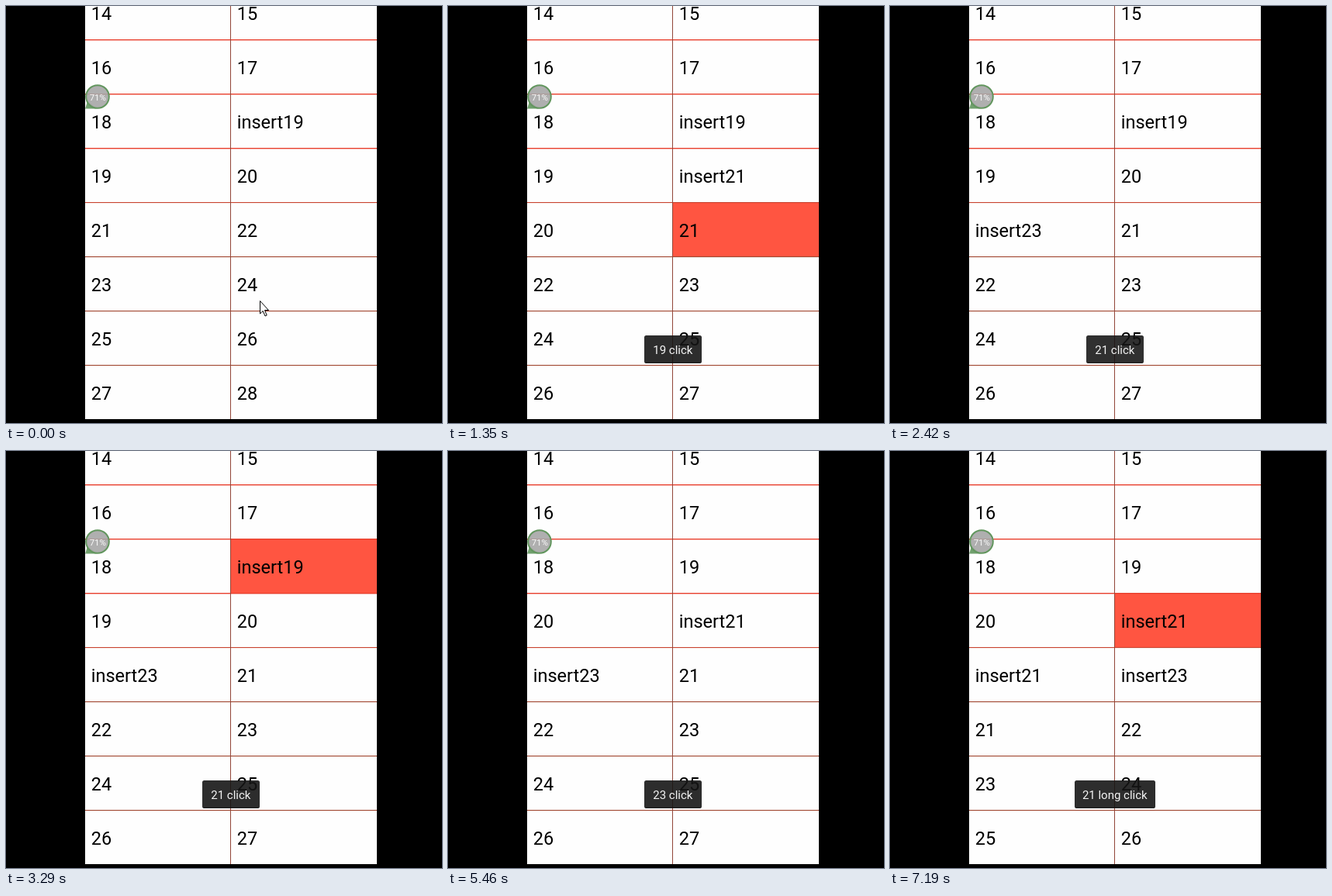
Recreate the animation shown at these times as an HTML page with a canvas. Size 562 px wide and 538 px high, loop 7.4 s.

```html
<!DOCTYPE html>
<html lang="en">
<head>
<meta charset="utf-8">
<title>Grid insert and remove</title>
<style>
html, body { margin: 0; width: 100%; height: 100%; overflow: hidden; background: #000; }
canvas { display: block; }
</style>
</head>
<body>
<canvas id="stage" width="562" height="538"></canvas>
<script>
const ctx = document.getElementById('stage').getContext('2d');
const LOOP = 7400;
const LEFT = 102, RIGHT = 478, MID = 289, BOTTOM = 533, ROW = 70;
const FIRST = 14; // index of the first visible cell

// Edits: time, index, insert or remove
const edits = [
  [880, 21, true], [1590, 23, true], [2420, 21, false],
  [3760, 19, false], [5460, 21, true], [6590, 21, true]
];

// Pressed cells: from, to, index
const presses = [
  [1350, 1590, 23], [2370, 2420, 21], [3290, 3760, 19],
  [6410, 6590, 21], [7190, LOOP, 21]
];

const toasts = [
  { at: 120, text: '19 click', width: 74 },
  { at: 1960, text: '21 click', width: 74 },
  { at: 3880, text: '23 click', width: 74 },
  { at: 5750, text: '21 long click', width: 104 }
];
const FADE_STEP = 58, FADE_STEPS = 9;

// Pointer: from, to, x, y
const pointers = [
  [0, 120, 327, 380], [6170, 6230, 509, 530],
  [6230, 6290, 485, 515], [6290, 6350, 497, 529]
];
const arrow = [[.5, .5], [.5, 17], [4.2, 13.5], [7, 20], [9.2, 19], [6.5, 12.5], [11.5, 12.5]];

const active = (t, [from, to]) => t >= from && t < to;

function toastFont() {
  ctx.font = 'condensed 16px Roboto, sans-serif';
  const narrow = ctx.measureText('21 long click').width < 85;
  return narrow ? ctx.font : '15px Roboto, sans-serif';
}
const TOAST_FONT = toastFont();

function itemsAt(t) {
  const items = Array.from({ length: 40 }, (_, i) => String(i));
  items.splice(19, 0, 'insert19');
  for (const [at, index, insert] of edits) {
    if (t < at) break;
    if (insert) items.splice(index, 0, 'insert' + index);
    else items.splice(index, 1);
  }
  return items;
}

function text(str, x, y, font, color, align = 'left') {
  ctx.font = font;
  ctx.fillStyle = color;
  ctx.textAlign = align;
  ctx.fillText(str, x, y);
}

function drawGrid(t) {
  ctx.fillStyle = '#fefefe';
  ctx.fillRect(LEFT, 0, RIGHT - LEFT, BOTTOM);

  for (const press of presses) {
    if (!active(t, press)) continue;
    const cell = press[2] - FIRST;
    ctx.fillStyle = '#ff5541';
    ctx.fillRect(cell % 2 ? MID : LEFT, 44 + ROW * (Math.floor(cell / 2) - 1),
      cell % 2 ? RIGHT - MID : MID - LEFT, ROW);
  }

  for (let r = 0; r < 7; r++) {
    ctx.fillStyle = r < 3 ? '#e8402e' : r < 4 ? '#c8432f' : '#a0452f';
    ctx.fillRect(LEFT, 43 + ROW * r, RIGHT - LEFT, r < 3 ? 1.4 : 1.1);
  }
  ctx.fillStyle = '#914638';
  ctx.fillRect(MID, 0, 1, BOTTOM);

  const items = itemsAt(t);
  for (let i = 0; i < 16; i++) {
    text(items[FIRST + i], i % 2 ? 297.8 : 109.8, 18 + ROW * Math.floor(i / 2),
      '23.5px Roboto, sans-serif', '#000');
  }
}

function drawBadge() {
  ctx.fillStyle = 'rgba(98,150,94,.9)';
  ctx.beginPath();
  ctx.moveTo(102, 132.5);
  ctx.lineTo(105, 123);
  ctx.lineTo(117, 132.5);
  ctx.fill();
  ctx.beginPath();
  ctx.arc(118, 117, 14.8, 0, Math.PI * 2);
  ctx.fillStyle = 'rgba(166,166,166,.9)';
  ctx.fill();
  ctx.strokeStyle = '#62965e';
  ctx.lineWidth = 2;
  ctx.stroke();
  text('71%', 118.3, 122, '11.5px Roboto, sans-serif', '#f8f8f8', 'center');
}

function drawToast({ text: label, width }, alpha) {
  if (alpha <= 0) return;
  const x = 290 - width / 2;
  ctx.globalAlpha = alpha;
  ctx.beginPath();
  ctx.roundRect(x, 425, width, 36, 2.5);
  ctx.fillStyle = 'rgba(20,20,20,.89)';
  ctx.fill();
  ctx.fillStyle = 'rgba(0,0,0,.3)';
  ctx.fillRect(x + 1, 459.5, width - 2, 1.5);
  text(label, 289.8, 449, TOAST_FONT, '#f4f4f4', 'center');
  ctx.globalAlpha = 1;
}

function drawToasts(t) {
  const i = toasts.findLastIndex(toast => t >= toast.at);
  if (i < 0) return;
  const step = Math.floor((t - toasts[i].at) / FADE_STEP) + 1;
  const p = Math.min(1, step / FADE_STEPS);
  if (i > 0) drawToast(toasts[i - 1], 1 - (p / .55) ** 2);
  drawToast(toasts[i], 1 - (1 - p) ** 2);
}

function drawPointer(t) {
  const spot = pointers.find(p => active(t, p));
  if (!spot) return;
  ctx.beginPath();
  for (const [x, y] of arrow) ctx.lineTo(spot[2] + x, spot[3] + y);
  ctx.closePath();
  ctx.fillStyle = '#fff';
  ctx.fill();
  ctx.strokeStyle = '#000';
  ctx.lineWidth = 1;
  ctx.stroke();
}

function draw(now) {
  const t = now % LOOP;
  ctx.fillStyle = '#000';
  ctx.fillRect(0, 0, 562, 538);
  drawGrid(t);
  drawBadge();
  drawToasts(t);
  drawPointer(t);
}

let start;
function tick(now) {
  start ??= now;
  draw(Math.max(0, now - start));
  requestAnimationFrame(tick);
}
draw(0);
requestAnimationFrame(tick);
</script>
</body>
</html>
```
